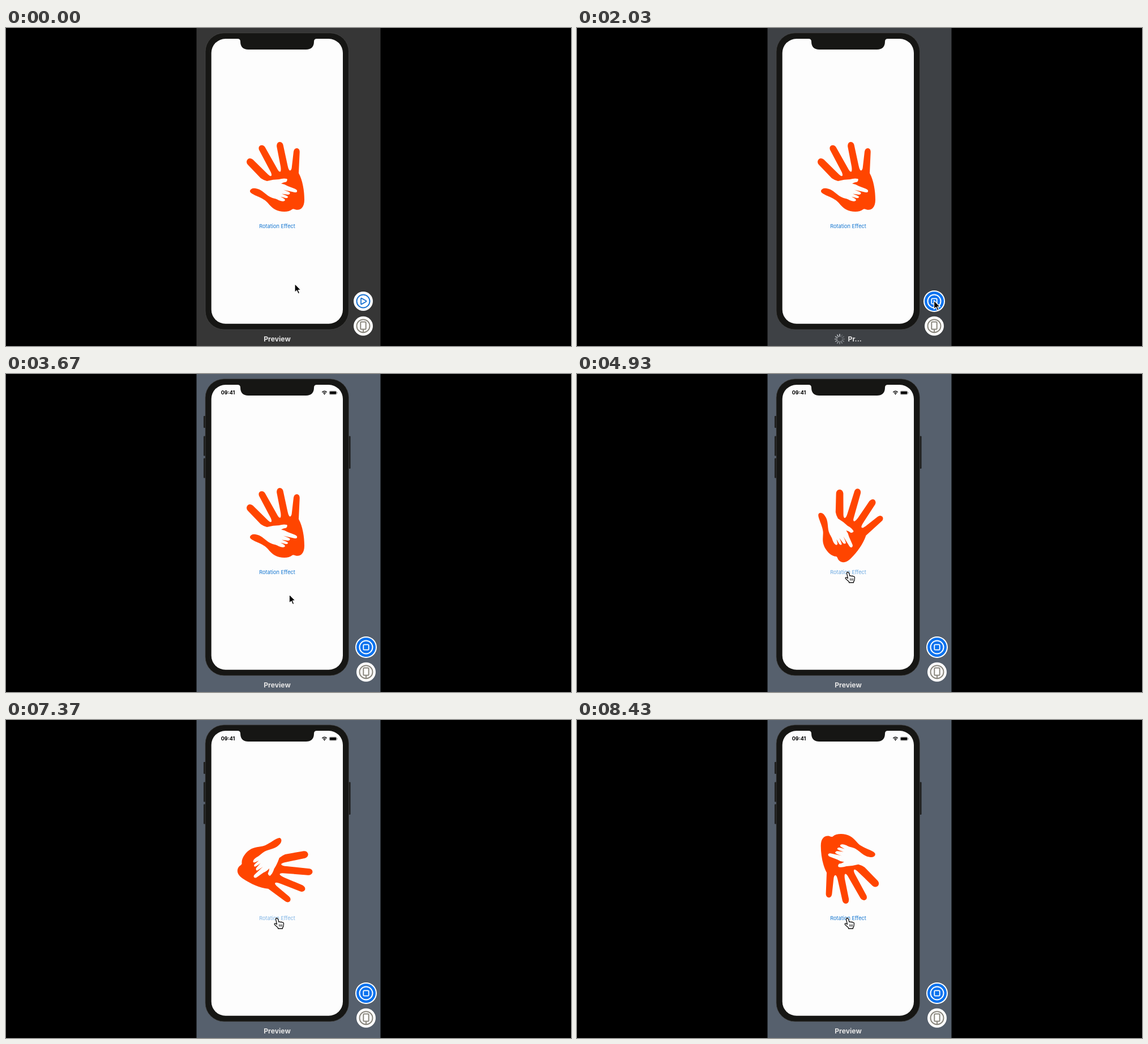
Write an HTML page that moves like this. It is 998 by 561 pixels and loops after 8460 ms.

```html
<!DOCTYPE html>
<html lang="en">
<head>
<meta charset="utf-8">
<title>Rotation Effect</title>
<style>
  html, body { margin: 0; width: 100%; height: 100%; overflow: hidden; background: #000; }
  svg { display: block; width: 998px; height: 561px; }
  text { font-family: Inter, "Liberation Sans", sans-serif; }
  .label { font-size: 12.2px; font-weight: 700; fill: #e4e4e4; }
  .line { fill: none; stroke-width: 2; stroke-linejoin: round; }
</style>
</head>
<body>
<svg viewBox="0 0 998 561">
  <rect width="998" height="561"/>
  <rect id="panel" x="336.5" width="325" height="561"/>

  <g id="sideButtons" fill="#1d1d1c">
    <rect x="349" y="74" width="5" height="21" rx="1"/>
    <rect x="349" y="109.500" width="5" height="35" rx="1"/>
    <rect x="349" y="148.500" width="5" height="35" rx="1"/>
    <rect x="603" y="109.500" width="5.500" height="57.500" rx="1"/>
  </g>
  <rect x="352" y="8.700" width="253.500" height="523.300" rx="33" fill="#161614" stroke="#494a48" stroke-width=".7"/>
  <rect x="362.700" y="19" width="232.300" height="502.700" rx="25" fill="#fdfdfd"/>
  <path d="M409 18.500V19Q414 19 414 24C414 33 419 38 428 38H530C539 38 544 33 544 24Q544 19 549 19V18.500Z" fill="#161614"/>

  <g id="status">
    <text x="392" y="36.300" text-anchor="middle" font-size="9" font-weight="700">09:41</text>
    <g fill="none" stroke="#111" stroke-width="1.500">
      <path d="M558.300 32.200Q562.500 28.400 566.700 32.200M560.200 34Q562.500 32 564.800 34"/>
    </g>
    <path d="M561 35L562.500 36.700L564 35Q562.500 34 561 35Z"/>
    <rect x="571" y="30" width="13" height="6.200" rx="1.800" fill="none" stroke="#777" stroke-width=".6"/>
    <rect x="571.800" y="30.800" width="11.400" height="4.600" rx="1"/>
    <path d="M584.800 32V34.300" stroke="#777"/>
  </g>

  <path id="hand" fill="#ff4500" d="M431 288C431 284 436 282 441 283C450 284 456 291 463 296C470 301 476 300 482 304
    Q489 307 492 305Q494 303 491 301L485 297.500L494 300Q498 300.500 498 297.500Q497 296 487 292.500L498 294Q502 293.500 501.500 290.500
    Q499 288.500 490 285.500L510 290Q514 290.500 514.300 287.500Q514 285 511 284L498 279Q492 275 486 274.500Q490 272 495 271.500
    Q498 268 496 266Q490 264.500 482 267Q472 267 461 270Q454 268 450 265L427 241Q423 236 427 231.500Q431 228.500 436 232
    L463 258.500Q468 263 469 260Q469.500 257 466 251L447 215Q445 209 450 207Q455 206 458 211L480 250Q483 255 485 253
    Q486 250 485 244L478.200 209Q478 202 483 201Q488 201 489.500 206L497.500 243Q499.500 252 502 251.500Q504.500 251 505 244
    L508 218Q509 212 514 212Q519 213 518.700 219L517 256C524 269 527 287 527 303C527 317 520 322 512 320.500
    Q508 318.500 506 319.500C499 326 484 325 475 320C466 315 463 307 456 303C447 297 431 293 431 288Z"/>
  <text id="button" x="479" y="353.200" text-anchor="middle" font-size="9.200" fill="#1275d0">Rotation Effect</text>

  <text id="title" class="label" x="479" y="553" text-anchor="middle">Preview</text>
  <g id="busy">
    <g id="spinner"></g>
    <text class="label" x="478.500" y="553">Pr...</text>
  </g>

  <g id="controls">
    <g id="play">
      <circle cx="631" cy="482" r="17" fill="#fff"/>
      <g class="line" stroke="#1b73d2">
        <circle cx="631" cy="482" r="11.500"/>
        <path d="M627 477.500Q627 476.300 628.200 476.900L636 481.200Q637 482 636 482.800L628.200 487.100Q627 487.700 627 486.500Z" stroke-width="1.800"/>
      </g>
    </g>
    <g id="stop">
      <circle cx="631" cy="482" r="19" fill="#fff"/>
      <circle cx="631" cy="482" r="17" fill="#0a72ee"/>
      <g class="line" stroke="#fff">
        <circle cx="631" cy="482" r="11.500"/>
        <rect x="626.300" y="477.300" width="9.400" height="9.400" rx="1.500" stroke-width="1.800"/>
      </g>
    </g>
    <circle cx="631" cy="525.700" r="17" fill="#fff"/>
    <g class="line" stroke="#8b887f" stroke-width="1.800">
      <circle cx="631" cy="525.700" r="11.500"/>
      <rect x="626.300" y="518.500" width="9.400" height="13" rx="1.500"/>
      <path d="M631 532V537"/>
    </g>
  </g>

  <path id="arrow" d="M0 0V15.500L3.600 12.200L6.100 17.900L8.700 16.800L6.300 11.300H11Z" stroke="#fff" stroke-width="1.300" stroke-linejoin="round"/>
  <g id="pointer" stroke="#111" stroke-width="1.300" stroke-linejoin="round">
    <path fill="#fff" d="M-2 2Q-2 0 -.500 0Q1.300 0 2 2L3.500 7Q5 5.800 6.500 7.200Q8 6 9.500 7.700Q12 7 12 10L11.500 14Q11 16 10 17V18.500H2V17L-4 11.500Q-5 9.500 -3 9.200L0 11Z"/>
    <path fill="none" stroke-width="1" d="M4 11L4.500 15M6.400 11L6.700 15M8.800 11V15"/>
  </g>
</svg>
<script>
const LOOP = 8460;
const CLICK = 1930, LIVE = 3220;
const taps = [{ press: 4540, release: 4640 }, { press: 7130, release: 7146 }];
const DARK = [54, 54, 54], BLUE = [86, 96, 109];

// time, x, y of the cursor tip
const path = [
  [30, 510, 451], [830, 629, 483], [1300, 630.5, 480.5], [2600, 630.5, 480.5],
  [2970, 599, 454], [3580, 501, 390], [4420, 478.5, 349.5], [8050, 478.5, 349.5], [8250, 477.5, 349.5]
];

const el = Object.fromEntries([...document.querySelectorAll("[id]")].map(e => [e.id, e]));
const clamp = v => Math.max(0, Math.min(1, v));
const mix = (a, b, p) => a + (b - a) * p;
const smooth = p => p * p * (3 - 2 * p);
const show = (e, on) => e.setAttribute("display", on ? "inline" : "none");

// critically damped spring, 0 to 1
function spring(ms) {
  const x = Math.max(0, ms) * 0.0058;
  return 1 - (1 + x) * Math.exp(-x);
}

function cursorAt(t) {
  let i = 0;
  while (i < path.length - 2 && t > path[i + 1][0]) i++;
  const a = path[i], b = path[i + 1];
  const p = smooth(clamp((t - a[0]) / (b[0] - a[0])));
  return [mix(a[1], b[1], p), mix(a[2], b[2], p)];
}

const spokes = Array.from({ length: 12 }, (_, i) => {
  const line = document.createElementNS("http://www.w3.org/2000/svg", "path");
  line.setAttribute("d", "M464 544V540.200");
  line.setAttribute("stroke", "#e4e8ec");
  line.setAttribute("stroke-width", "1.600");
  line.setAttribute("stroke-linecap", "round");
  line.setAttribute("transform", `rotate(${i * 30} 464 548.700)`);
  return el.spinner.appendChild(line);
});

function draw(t) {
  const running = t >= CLICK, live = t >= LIVE;
  const tint = smooth(clamp((t - CLICK) / 300));
  el.panel.setAttribute("fill", `rgb(${DARK.map((c, i) => Math.round(mix(c, BLUE[i], tint)))})`);

  show(el.play, !running);
  show(el.stop, running);
  show(el.busy, running && !live);
  show(el.title, !running || live);
  show(el.sideButtons, live);
  show(el.status, live);
  el.controls.setAttribute("transform", `translate(${live ? 5 : 0} 0)`);

  const head = Math.floor(t / 83);
  spokes.forEach((s, i) => {
    const age = (((head - i) % 12) + 12) % 12;
    s.setAttribute("opacity", mix(0.8, 0.2, age / 11));
  });

  let angle = 0, alpha = 1;
  for (const { press, release } of taps) {
    const p = spring(t - release);
    angle += 90 * p;
    if (t >= press) alpha = mix(0.25, 1, p);
  }
  el.hand.setAttribute("transform", `rotate(${angle} 479 262.500)`);
  el.button.setAttribute("opacity", alpha);

  const [x, y] = cursorAt(t);
  const over = live && y < 356;
  show(el.arrow, !over);
  show(el.pointer, over);
  (over ? el.pointer : el.arrow).setAttribute("transform", `translate(${x} ${y})`);
}

const start = performance.now();
function tick() {
  draw((performance.now() - start) % LOOP);
  requestAnimationFrame(tick);
}
tick();
</script>
</body>
</html>
```
